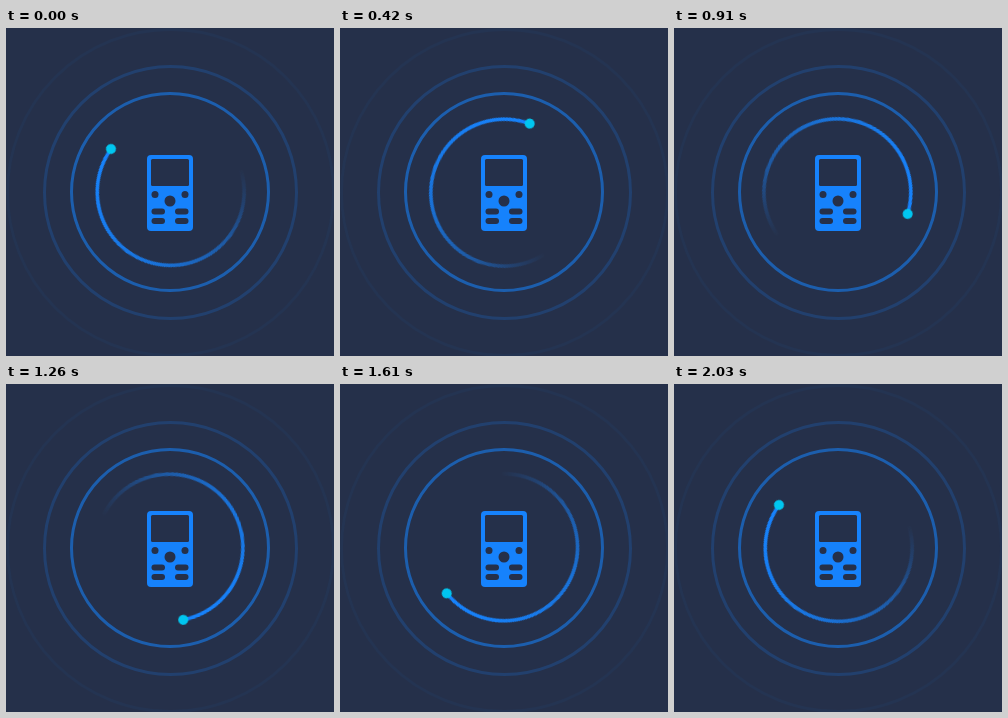
Animation of 328 by 328 pixels, one loop 2.1 s. Source, as an HTML page:

```html
<!DOCTYPE html>
<html lang="en">
<head>
<meta charset="utf-8">
<title>Phone scan</title>
<style>
  html, body { margin: 0; width: 100%; height: 100%; overflow: hidden; background: #25304a; }
  .stage { position: relative; width: 328px; height: 328px; --blue: #1682fc; }
  svg { position: absolute; inset: 0; display: block; }
  .rings { fill: none; stroke: var(--blue); stroke-width: 3; }
  .body { fill: var(--blue); }
  .cut { fill: #25304a; }

  /* 30 poses, the first and the last a full turn apart */
  .spin {
    position: absolute; inset: 0;
    animation: spin 2100ms steps(30, jump-none) infinite;
  }
  @keyframes spin {
    from { transform: rotate(306.1deg); }
    to { transform: rotate(666.1deg); }
  }
  /* The trail sits slightly off the axis, away from its head */
  .trail {
    position: absolute; left: 88.5px; top: 89.4px; width: 151px; height: 151px;
    border-radius: 50%;
    background: conic-gradient(
      rgba(22, 130, 252, 0) 126deg, rgba(22, 130, 252, .2) 153deg,
      rgba(22, 130, 252, .48) 183deg, rgba(22, 130, 252, .78) 240deg,
      rgba(22, 130, 252, .95) 310deg, rgb(22, 130, 252) 360deg);
    -webkit-mask: radial-gradient(circle, transparent 71.2px, #000 72.1px, #000 75px, transparent 75.9px);
    mask: radial-gradient(circle, transparent 71.2px, #000 72.1px, #000 75px, transparent 75.9px);
  }
  .dot {
    position: absolute; left: 159px; top: 86.2px; width: 10px; height: 10px;
    border-radius: 50%; background: #00c6f0;
  }
</style>
</head>
<body>
<div class="stage">
  <svg width="328" height="328" viewBox="0 0 328 328">
    <g class="rings">
      <circle cx="164" cy="164" r="98.5" opacity=".56"/>
      <circle cx="164.5" cy="164.5" r="126" opacity=".2"/>
      <circle cx="164.5" cy="164.5" r="163" opacity=".045"/>
    </g>
    <rect class="body" x="141" y="127" width="46" height="76" rx="4"/>
    <g class="cut">
      <rect x="145" y="131" width="38" height="27" rx="1.5"/>
      <circle cx="149" cy="166.5" r="3.5"/>
      <circle cx="179" cy="166.5" r="3.5"/>
      <circle cx="164" cy="173" r="5.5"/>
      <rect x="145.5" y="180.5" width="13.5" height="6" rx="3"/>
      <rect x="169" y="180.5" width="13.5" height="6" rx="3"/>
      <rect x="145.5" y="190" width="13.5" height="6" rx="3"/>
      <rect x="169" y="190" width="13.5" height="6" rx="3"/>
    </g>
  </svg>
  <div class="spin">
    <div class="trail"></div>
    <div class="dot"></div>
  </div>
</div>
</body>
</html>
```
